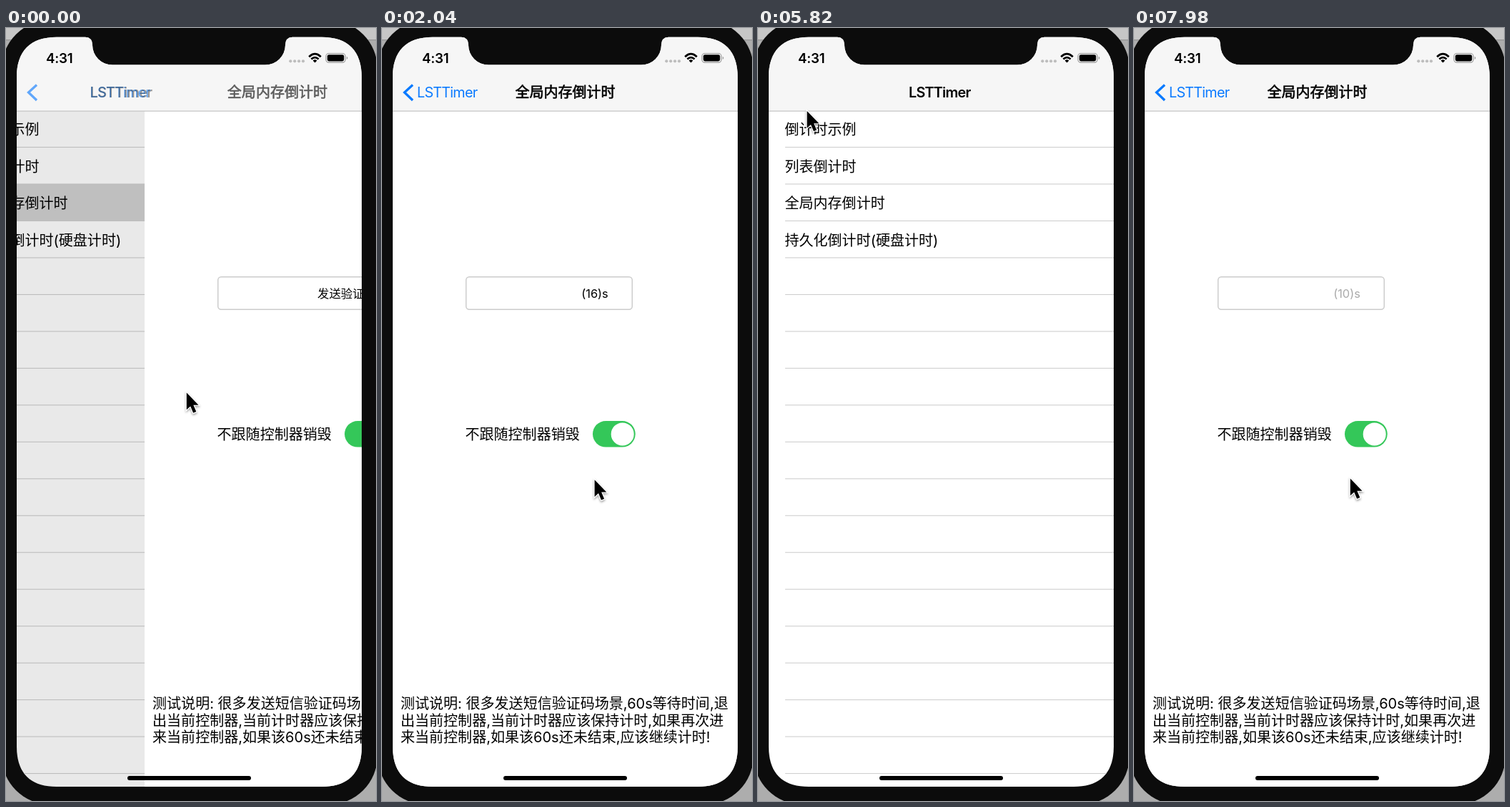
Animation, 518 px wide and 1080 px high, one loop 8 s. Source, as an HTML page:

```html
<!DOCTYPE html>
<html lang="zh">
<head>
<meta charset="utf-8">
<style>
  html, body { margin: 0; width: 100%; height: 100%; overflow: hidden; background: #adadad; }
  svg { display: block; width: 100vw; height: 100vh; }
  text { font: 20.05px Inter, "Noto Sans CJK SC", "Noto Sans CJK", sans-serif; white-space: pre; }
  .latin { font-size: 19.8px; letter-spacing: -.75px; }
  .strong { font-weight: 600; }
  .small { font-size: 16.4px; }
  .mid { text-anchor: middle; }
  .blue { fill: #0a7aff; }
  #title { stroke: #000; stroke-width: .6px; }
</style>
</head>
<body>
<svg viewBox="0 0 518 1080">
  <defs>
    <clipPath id="screen">
      <path d="M71 12.7H111Q121 13 121 24A28 27.5 0 0 0 149 51.5H363A28 27.5 0 0 0 391 24Q391 13 401 12.7H442C479 12.7 498 32 498 69V1004C498 1041 479 1060 442 1060H71C34 1060 15 1041 15 1004V69C15 32 34 12.7 71 12.7Z"/>
    </clipPath>
    <filter id="shade" x="-50%" y="-50%" width="200%" height="200%">
      <feDropShadow dx="0" dy="2" stdDeviation="1.6" flood-opacity=".4"/>
    </filter>
  </defs>

  <rect width="518" height="17" fill="#c6c6c6"/>
  <rect y="16" width="518" height="1.5" fill="#999"/>
  <rect x="-6" y="-11" width="526" height="1096" rx="68" fill="#0c0c0c"/>

  <g clip-path="url(#screen)">
    <rect x="15" y="12" width="483" height="1048" fill="#fff"/>
    <g id="list">
      <rect id="highlight" x="15" y="218" width="483" height="51.5" fill="#d1d1d1"/>
      <g id="rows"></g>
    </g>
    <rect id="dim" x="15" y="116" width="483" height="944"/>

    <g id="page">
      <rect x="15" y="116" width="483" height="944" fill="#fff"/>
      <rect x="117.7" y="347.7" width="232.6" height="45.6" rx="4.5" fill="#fff" stroke="#ccc" stroke-width="1.5"/>
      <text id="button" class="small mid" x="298" y="377"></text>
      <text x="116.5" y="575">不跟随控制器销毁</text>
      <rect x="295" y="549" width="59.7" height="36.6" rx="18.3" fill="#34c759"/>
      <circle cx="336.7" cy="567.4" r="16" fill="#fff"/>
      <text x="26" y="950.5">测试说明: 很多发送短信验证码场景,60s等待时间,退</text>
      <text x="26" y="974.5">出当前控制器,当前计时器应该保持计时,如果再次进</text>
      <text x="26" y="998">来当前控制器,如果该60s还未结束,应该继续计时!</text>
    </g>

    <rect x="15" y="12" width="483" height="104" fill="#f6f6f6"/>
    <rect x="15" y="115.5" width="483" height="1.2" fill="#c4c4c4"/>
    <path id="chevron" d="M43 79.5L31.5 90L43 101" fill="none" stroke="#0a7aff" stroke-width="3.3"/>
    <text id="back" class="latin blue" x="49" y="97">LSTTimer</text>
    <text id="root" class="latin strong" x="211" y="97">LSTTimer</text>
    <text id="title" class="mid" x="256.5" y="97.3">全局内存倒计时</text>

    <text class="strong" x="56" y="49" style="font-size:18.8px;letter-spacing:-.2px">4:31</text>
    <g fill="#bdbdbd">
      <circle cx="398.3" cy="46.3" r="2.1"/><circle cx="404.2" cy="46.3" r="2.1"/>
      <circle cx="410.1" cy="46.3" r="2.1"/><circle cx="416" cy="46.3" r="2.1"/>
    </g>
    <g fill="none" stroke="#000" stroke-width="2.7">
      <path d="M424.2 40.2Q432.5 32.2 440.8 40.2M427.4 43.5Q432.5 38.8 437.6 43.5"/>
      <path d="M432.5 48.5L429.6 45.5Q432.5 43 435.4 45.5Z" fill="#000" stroke="none"/>
    </g>
    <rect x="448" y="35.5" width="27" height="12.6" rx="3.8" fill="none" stroke="#9a9a9a" stroke-width="1.2"/>
    <rect x="449.8" y="37.2" width="23.4" height="9.2" rx="2.3"/>
    <path d="M476.8 39.7Q480 41.8 476.8 43.9Z" fill="#9a9a9a"/>
    <rect x="170" y="1045" width="173" height="6" rx="3"/>
  </g>

  <g id="cursor">
    <path transform="translate(.8 1.5) scale(.9)" d="M0 0V26.5L6 21L10.4 31.4L15 29.5L10.6 19.2H18.6Z" stroke="#fff" stroke-width="2.4" paint-order="stroke" filter="url(#shade)"/>
  </g>
</svg>

<script>
const LOOP = 8000, STEP = 60, WIDTH = 483;
const PUSH_1 = -122, POP = 5240, PUSH_2 = 6720;
const SEND = '发送验证码';
const el = id => document.getElementById(id);

const labels = ['倒计时示例', '列表倒计时', '全局内存倒计时', '持久化倒计时(硬盘计时)'];
let rows = labels.map((s, i) => `<text x="37.5" y="${149 + i * 51.5}">${s}</text>`).join('');
for (let i = 0; i < 18; i++)
  rows += `<rect x="38" y="${166 + i * 51.47}" width="460" height="1.1" fill="#cfcfcf"/>`;
el('rows').innerHTML = rows;

// time, x, y of the pointer tip
const path = [
  [0, 252, 508], [120, 286, 582], [300, 293, 618], [480, 295, 627], [2400, 297, 630],
  [2760, 335, 733], [3000, 322, 720], [3420, 322, 720], [4260, 66, 112], [4680, 61, 100],
  [4920, 47, 84], [5640, 47, 84], [6300, 161, 251], [6570, 161, 251], [6700, 190, 330],
  [6840, 252, 508], [6960, 286, 582], [7140, 297, 618], [7320, 302, 628], [8000, 302, 628]
];

function pointer(t) {
  const i = path.findIndex(p => p[0] > t);
  const [a, b] = [path[i - 1], path[i]];
  const span = b[0] - a[0];
  let k = (t - a[0]) / span;
  if (span > 400) k = k * k * (3 - 2 * k);
  return [a[1] + (b[1] - a[1]) * k, a[2] + (b[2] - a[2]) * k];
}

// Critically damped spring: remaining distance from 1 to 0
function spring(ms) {
  const w = Math.max(0, ms) * .0175;
  return w > 10 ? 0 : (1 + w) * Math.exp(-w);
}

// 1 = list in view, 0 = detail page in view
function listShare(t) {
  if (t < POP) return spring(t - PUSH_1);
  return t < PUSH_2 ? 1 - spring(t - POP) : spring(t - PUSH_2);
}

function buttonState(t) {
  if (t >= 7920) return ['(10)s', t - 7920];
  if (t < 1080 || t > 6000) return [SEND, LOOP];
  const n = Math.min(4, Math.floor((t - 1080) / 1030));
  return [`(${16 - n})s`, t - 1080 - n * 1030];
}

const shift = (id, x, y = 0) => el(id).setAttribute('transform', `translate(${x} ${y})`);
const fade = (id, v) => el(id).setAttribute('opacity', v);

function draw(t) {
  const q = listShare(t);
  shift('page', WIDTH * q);
  shift('list', -.3 * WIDTH * (1 - q));
  fade('dim', .135 * (1 - q));
  fade('highlight', t > POP && t < 6600 ? spring(t - POP) : 1);

  shift('title', 333 * q);
  shift('back', 185 * q);
  shift('root', 148 * (q - 1));
  for (const id of ['title', 'back', 'chevron']) fade(id, 1 - q);
  fade('root', q);

  const [label, age] = buttonState(t);
  el('button').textContent = label;
  fade('button', Math.min(1, age / 180));
  shift('cursor', ...pointer(t));
}

const start = performance.now();
function frame() {
  const t = (performance.now() - start) % LOOP;
  draw(Math.floor(t / STEP) * STEP);
  requestAnimationFrame(frame);
}
frame();
</script>
</body>
</html>
```
